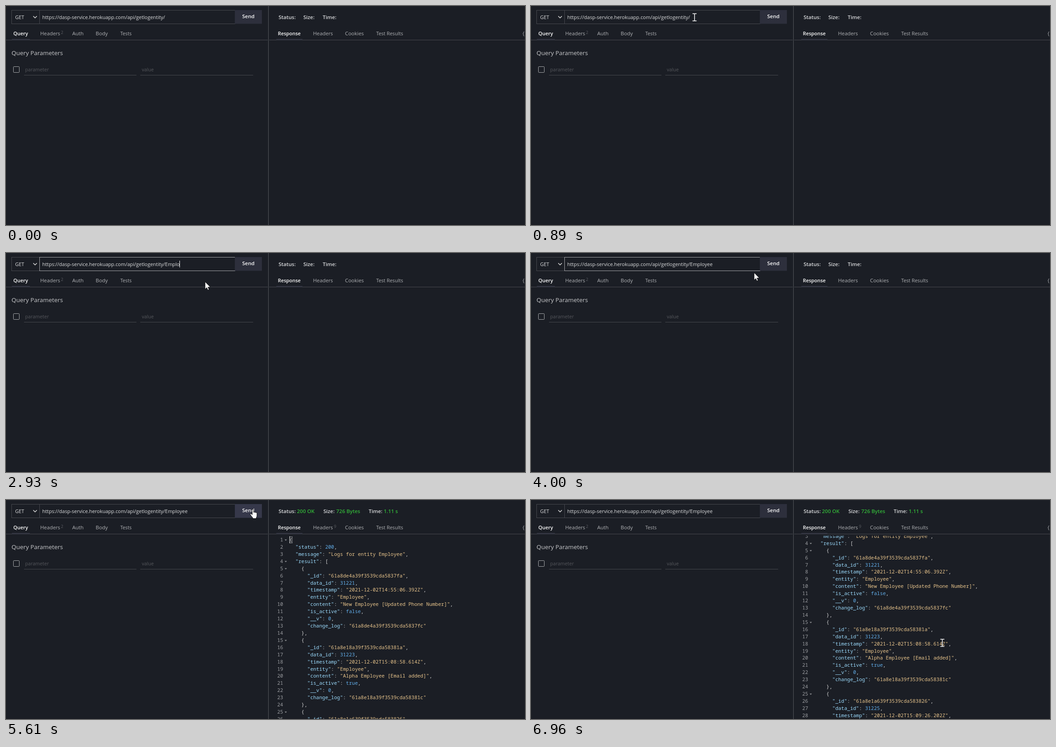
An HTML page for the animation above (8000 ms loop, 1152 by 486 pixels).

```html
<!DOCTYPE html>
<html lang="en">
<head>
<meta charset="utf-8">
<title>API request</title>
<style>
  html, body { margin: 0; width: 100%; height: 100%; overflow: hidden; background: #1b1e25; }
  svg { display: block; width: 1152px; height: 486px; }
  text { font-family: "Open Sans", "Noto Sans", sans-serif; font-size: 11.25px; fill: #b0b2b5; white-space: pre; }
  .bold { font-size: 11.5px; font-weight: 600; fill: #dcdddf; }
  .on { fill: #fff; font-weight: 600; }
  .good { fill: #33b539; }
  .url { font-size: 10.96px; fill: #dedfe0; }
  .title { font-size: 13.4px; fill: #c9cacc; }
  .hint { font-size: 10.7px; fill: #55575c; }
  .sup { font-size: 8.8px; fill: #5d5f65; }
  .code text { font-family: "Noto Sans Mono", "Liberation Mono", monospace; font-size: 11px; fill: #d4d4d4; }
  .code .num { fill: #9b9da1; text-anchor: end; }
  .code .key { fill: #9cdcfe; }
  .code .str { fill: #e9c58c; }
  .code .lit { fill: #62aeea; }
  .line { stroke: #47494f; fill: none; }
</style>
</head>
<body>
<svg id="stage" viewBox="0 0 1152 486" xmlns="http://www.w3.org/2000/svg"></svg>
<script>
const LOOP = 8000;
const BASE = 'https://dasp-service.herokuapp.com/api/getlogentity/';
const WORD = 'Employee';
const KEY_TIMES = [2040, 2085, 2130, 2180, 2930, 3190, 3310, 3420];
const CARET_ON = [[1020, 1860], [2040, 2600], [2930, 3920]];
const SENT = 4340, DONE = 5610, SCROLLED = 6960;
const ROW = 15.92;

// Pointer path: time, x, y
const PATH = [
  [140, 1019, 464], [300, 850, 345], [500, 560, 150], [640, 415, 55],
  [750, 355, 27], [890, 363, 25], [2040, 363, 25], [2130, 385, 33],
  [2320, 442, 64], [3900, 442, 64], [4010, 500, 42], [4130, 548, 20],
  [6350, 548, 20], [6480, 650, 100], [6640, 850, 260], [6760, 913, 317], [LOOP, 913, 317]
];

const text = (x, y, s, cls = '', extra = '') => `<text x="${x}" y="${y}" class="${cls}" ${extra}>${s}</text>`;
const rect = (x, y, w, h, extra) => `<rect x="${x}" y="${y}" width="${w}" height="${h}" ${extra}/>`;
const size = px => `style="font-size:${px}px"`;

const log = (id, data, stamp, content, active, change) => [
  '    {',
  `      "_id": "${id}",`,
  `      "data_id": ${data},`,
  `      "timestamp": "${stamp}",`,
  '      "entity": "Employee",',
  `      "content": "${content}",`,
  `      "is_active": ${active},`,
  '      "__v": 0,',
  `      "change_log": "${change}"`,
  '    },'
];

const rows = [
  '{', '  "status": 200,', '  "message": "Logs for entity Employee",', '  "result": [',
  ...log('61a8de4a39f3539cda5837fa', 31221, '2021-12-02T14:55:06.392Z',
    'New Employee [Updated Phone Number]', false, '61a8de4a39f3539cda5837fc'),
  ...log('61a8e18a39f3539cda58381a', 31223, '2021-12-02T15:08:58.614Z',
    'Alpha Employee [Email added]', true, '61a8e18a39f3539cda58381c'),
  '    {', '      "_id": "61a8e1a639f3539cda583826",', '      "data_id": 31225,',
  '      "timestamp": "2021-12-02T15:09:26.202Z",'
];

const paint = row => row.replace(/("[^"]*")(:?)|\b(\d+|true|false)\b/g, (all, quoted, colon, lit) =>
  lit ? `<tspan class="lit">${lit}</tspan>`
      : `<tspan class="${colon ? 'key' : 'str'}">${quoted}</tspan>${colon}`);

function codeRow(row, i) {
  const y = 92 + i * ROW;
  const fold = /[{[]$/.test(row) ? `<path d="M618.5 ${y - 4.5}h5l-2.5 3z" fill="#8b8d91"/>` : '';
  const indent = row.search(/\S/);
  return text(615.2, y, i + 1, 'num') + fold + text(629.2 + indent * 6.6, y, paint(row.trim()));
}

const tabs = list => list.map(([x, s, px, cls]) => text(x, 65, s, cls, size(px))).join('');

document.getElementById('stage').innerHTML = `
  <defs><clipPath id="pane">${rect(584, 79.5, 568, 406.5, '')}</clipPath></defs>
  ${rect(0, 0, 1152, 486, 'fill="#1b1e25"')}
  <path d="M.5 0V485H1152" fill="none" stroke="#16181e"/>
  <path d="M582.5 0V486" stroke="#55575c"/>
  <path class="line" d="M0 75.5H581M584 75.5H1152M40 153.5H289.5M298 153.5H548.5"/>
  ${rect(13, 73, 40, 2.5, 'fill="#30323f"')}
  ${rect(600, 73, 58, 2.5, 'fill="#30323f"')}
  ${rect(12.5, 9.5, 62, 30, 'class="line"')}
  ${rect(74.5, 9.5, 434, 30, 'class="line"')}
  ${rect(74.5, 9.5, 434, 30, 'id="focus" fill="none" stroke="#a6a7aa"')}
  ${text(20.2, 29, 'GET', 'url')}
  <path d="M60.5 22.5l4 4 4-4" fill="none" stroke="#e0e0e0" stroke-width="1.5"/>
  ${text(80.5, 29, '', 'url', 'id="url"')}
  ${rect(0, 17, 1, 15, 'id="caret" fill="#fff"')}
  ${rect(508, 9, 60, 30.5, 'fill="#2d2f3c"')}
  ${rect(508, 9, 60, 30.5, 'id="hover" fill="#36384a"')}
  ${rect(508, 9, 60, 30.5, 'id="press" fill="#babab6"')}
  ${text(524.3, 27.3, 'Send', 'bold on')}
  ${tabs([[16.3, 'Query', 11, 'on'], [76, 'Headers', 11.3], [147, 'Auth', 11.4], [199, 'Body', 11.4], [253.7, 'Tests', 10.7]])}
  ${text(122, 62, '2', 'sup')}
  ${text(12.3, 109, 'Query Parameters', 'title')}
  ${rect(16.5, 134.5, 13, 13, 'rx="1" fill="none" stroke="#a9abad"')}
  ${text(42.5, 144.5, 'parameter', 'hint')}
  ${text(301.5, 144.5, 'value', 'hint')}
  ${tabs([[603.5, 'Response', 10.9, 'on'], [681.5, 'Headers', 11.3], [752.5, 'Cookies', 11.45], [821.7, 'Test Results', 10.9], [1146.5, '{', 11]])}
  <g id="idle">${text(605, 29.3, 'Status:', 'bold')}${text(660, 29.3, 'Size:', 'bold')}${text(703, 29.3, 'Time:', 'bold')}</g>
  <g id="busy">
    ${text(605, 29.3, 'Processing, Please Wait...', 'bold')}
    <circle cx="874" cy="309" r="13.5" fill="none" stroke="#30323b" stroke-width="2.6"/>
    ${text(842.7, 345.3, 'Processing...', '', 'style="font-size:10.66px;fill:#687080"')}
  </g>
  <g id="done">
    ${text(605, 29.3, 'Status:', 'bold')}${text(645.8, 29.3, '200 OK', 'bold good')}
    ${text(704.5, 29.3, 'Size:', 'bold')}${text(733, 29.3, '726 Bytes', 'bold good')}
    ${text(805, 29.3, 'Time:', 'bold')}${text(838.5, 29.3, '1.11 s', 'bold good')}
    ${text(728, 62, '9', 'sup')}
    <g clip-path="url(#pane)"><g id="code" class="code">
      ${rect(629.5, 81.5, 6, 14, 'fill="none" stroke="#85878b"')}
      ${rect(629, 80.5, 1.2, 15.5, 'fill="#d8d8d8"')}
      ${rows.map(codeRow).join('')}
    </g></g>
  </g>
  <g id="pointer">
    <path id="arrow" d="M0 0V16.2L3.7 12.7 6.2 18.2 8.6 17.2 6.2 11.8H11.5Z" fill="#fff" stroke="#000" stroke-width=".7"/>
    <path id="beam" d="M-4.5 -8H-1Q0 -8 0 -7 0 -8 1 -8H4.5M0 -7.5V7.5M-4.5 8H-1Q0 8 0 7 0 8 1 8H4.5" fill="none" stroke="#fff" stroke-width="1.5"/>
    <path id="hand" transform="translate(-7 0)" d="M5.5 1.8a1.5 1.5 0 0 1 3 0V7.5a1.3 1.3 0 0 1 2.6.5 1.3 1.3 0 0 1 2.6.6 1.2 1.2 0 0 1 2.3.8V15c0 2-1.5 3-1.5 6H7c0-2-2-3.5-3.5-5.5L1.2 12c-.8-1.2 1-2.4 2.1-1.3L5.5 12.6z" fill="#fff" stroke="#000" stroke-width=".9"/>
  </g>`;

const el = {};
document.querySelectorAll('#stage [id]').forEach(n => el[n.id] = n);
const show = (node, on) => node.setAttribute('visibility', on ? 'inherit' : 'hidden');
const fade = (node, v) => node.setAttribute('opacity', v);
const ramp = (t, a, b) => Math.min(1, Math.max(0, (t - a) / (b - a)));

function pointerAt(t) {
  const i = PATH.findIndex(p => p[0] > t);
  if (i < 1) return PATH[0].slice(1);
  const [t0, x0, y0] = PATH[i - 1], [t1, x1, y1] = PATH[i];
  const k = (t - t0) / (t1 - t0);
  return [x0 + (x1 - x0) * k, y0 + (y1 - y0) * k];
}

function pointerShape(t, x, y) {
  if (y > 8 && y < 40 && x > 75 && x < 568) return x < 508 ? 'beam' : 'hand';
  return t > DONE && x > 584 && y > 79 ? 'beam' : 'arrow';
}

function draw(t) {
  el.url.textContent = BASE + WORD.slice(0, KEY_TIMES.filter(k => k <= t).length);
  el.caret.setAttribute('x', Math.round(80.5 + el.url.getComputedTextLength()));
  show(el.caret, CARET_ON.some(([a, b]) => t >= a && t < b));
  fade(el.focus, (0.6 * ramp(t, 1000, 1120) + 0.4 * ramp(t, 1330, 1400)) * (1 - ramp(t, 4270, 4400)));

  show(el.idle, t < SENT);
  show(el.busy, t >= SENT && t < DONE);
  show(el.done, t >= DONE);
  el.code.setAttribute('transform', `translate(0 ${t >= SCROLLED ? -40 : 0})`);

  const [x, y] = pointerAt(t), shape = pointerShape(t, x, y);
  show(el.pointer, t >= 140);
  el.pointer.setAttribute('transform', `translate(${x.toFixed(1)} ${y.toFixed(1)})`);
  for (const name of ['arrow', 'beam', 'hand']) show(el[name], name === shape);
  show(el.hover, shape === 'hand');
  fade(el.press, t < DONE ? ramp(t, 4260, 4400) : 0);
}

const start = performance.now();
function tick() {
  draw((performance.now() - start) % LOOP);
  requestAnimationFrame(tick);
}
tick();
</script>
</body>
</html>
```
